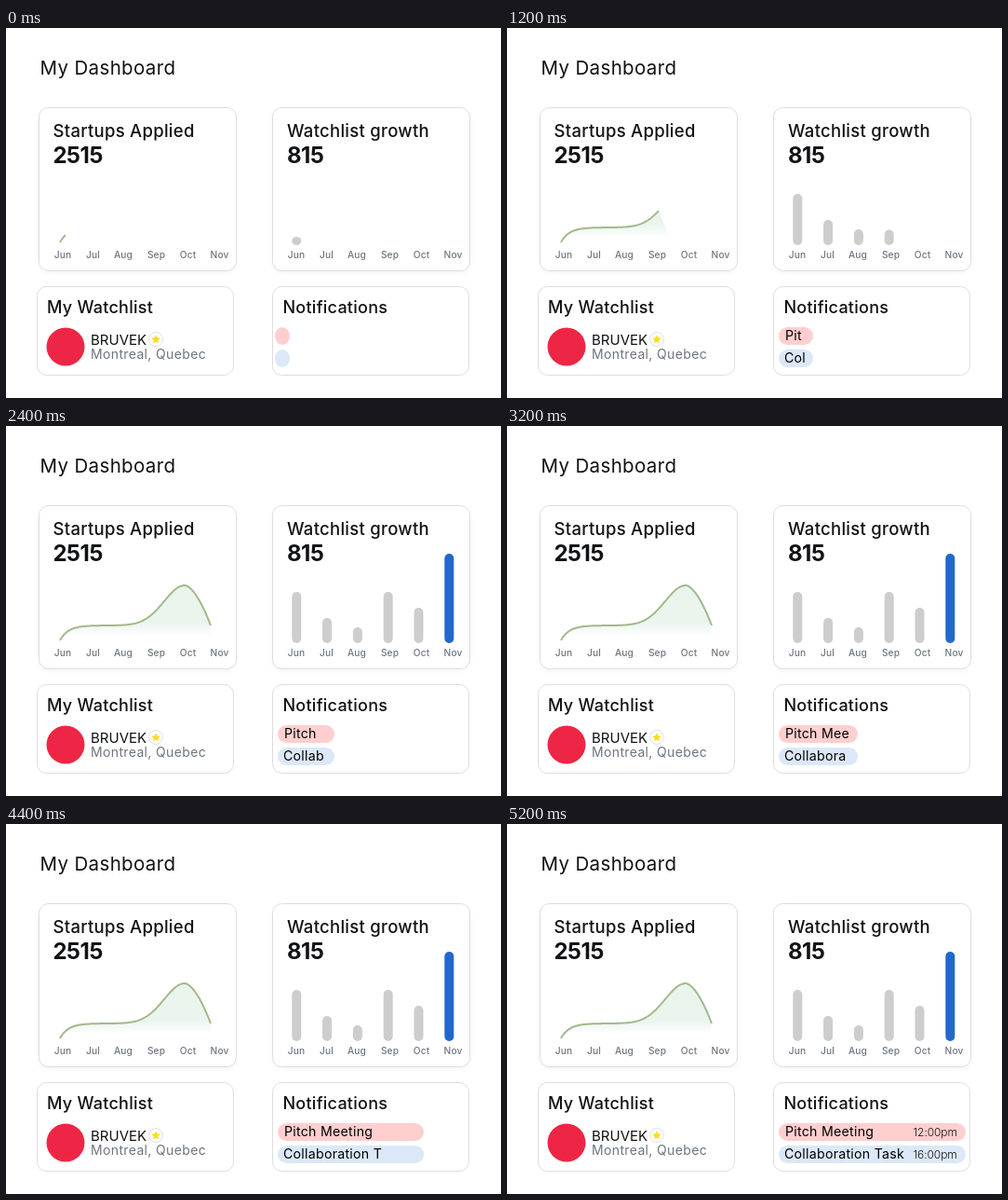
Recreate the animation shown at these times as an HTML page. Size 532 by 397 pixels, loop 5600 ms.

```html
<!DOCTYPE html>
<html lang="en">
<head>
<meta charset="utf-8">
<title>My Dashboard</title>
<style>
  html, body { margin: 0; width: 100%; height: 100%; overflow: hidden; background: #fff; }
  svg { display: block; width: 532px; height: 397px; font-family: Inter, sans-serif; fill: #111214; }
  .card { fill: #fff; stroke: #dcdddf; }
  .raised { filter: drop-shadow(0 2px 2px rgba(0, 0, 0, .04)); }
  .title { font-size: 20.5px; letter-spacing: .35px; }
  .head { font-size: 18.5px; font-weight: 500; letter-spacing: .28px; }
  .sub { font-size: 18px; font-weight: 500; letter-spacing: .25px; }
  .total { font-size: 24px; font-weight: 700; letter-spacing: -.5px; }
  .month { font-size: 10.2px; font-weight: 500; letter-spacing: .1px; fill: #6c757f; text-anchor: middle; }
  .name { font-size: 15px; }
  .place { font-size: 14px; letter-spacing: .36px; fill: #6c757f; }
  .note { font-size: 14.2px; letter-spacing: .25px; fill: #000; }
  .time { font-size: 12px; font-weight: 300; letter-spacing: -.1px; }
</style>
</head>
<body>
<svg viewBox="0 0 532 397">
  <defs>
    <linearGradient id="fade" gradientUnits="userSpaceOnUse" x1="0" y1="170" x2="0" y2="225">
      <stop offset="0" stop-color="#e9f4ec"/>
      <stop offset=".75" stop-color="#ebf5ee"/>
      <stop offset="1" stop-color="#ebf5ee" stop-opacity="0"/>
    </linearGradient>
  </defs>

  <text class="title" x="36.5" y="50">My Dashboard</text>

  <rect class="card raised" x="35.5" y="85.5" width="212" height="175" rx="10"/>
  <rect class="card raised" x="286.5" y="85.5" width="212" height="175" rx="10"/>
  <rect class="card" x="33.5" y="277.5" width="211" height="95" rx="10"/>
  <rect class="card" x="286.5" y="277.5" width="211" height="95" rx="10"/>

  <text class="head" x="50.5" y="117">Startups Applied</text>
  <text class="total" x="50.5" y="145">2515</text>
  <text class="head" x="302" y="117">Watchlist growth</text>
  <text class="total" x="302" y="145">815</text>

  <g id="months"></g>
  <path id="area" fill="url(#fade)"/>
  <path id="line" fill="none" stroke="#a3b98c" stroke-width="2"/>
  <g id="bars"></g>

  <text class="sub" x="44" y="306">My Watchlist</text>
  <circle cx="64" cy="342" r="20.5" fill="#ee2645"/>
  <text class="name" x="91" y="340">BRUVEK</text>
  <circle cx="161" cy="334" r="7.5" fill="#fff" stroke="#dfe0e2"/>
  <path id="star" fill="#ffdc1c"/>
  <text class="place" x="91" y="355">Montreal, Quebec</text>

  <text class="sub" x="297.5" y="306">Notifications</text>
  <g id="notes"></g>
</svg>

<script>
const LOOP = 5600, STEP = 400, BASE = 233;
const $ = id => document.getElementById(id);

function add(parent, tag, attrs, text = '') {
  const el = document.createElementNS('http://www.w3.org/2000/svg', tag);
  for (const k in attrs) el.setAttribute(k, attrs[k]);
  el.textContent = text;
  return parent.appendChild(el);
}

const months = [
  ['Jun', 61, 55], ['Jul', 93.5, 27], ['Aug', 126, 17],
  ['Sep', 161.5, 55], ['Oct', 195.5, 38], ['Nov', 229.5, 96]
];
const bars = months.map(([name, x, full], i) => {
  for (const dx of [0, 251]) add($('months'), 'text', { class: 'month', x: x + dx, y: 247 }, name);
  const fill = name === 'Nov' ? '#2168cd' : '#cdcdcd';
  const el = add($('bars'), 'rect', { x: 307.3 + 32.8 * i, width: 10, rx: 5, fill });
  return { el, full };
});

const notes = [
  ['Pitch Meeting', '12:00pm', 299, 321, '#ffcfcf'],
  ['Collaboration Task', '16:00pm', 298, 345, '#dce8f7']
].map(([text, time, x, y, fill]) => ({
  text,
  pill: add($('notes'), 'rect', { y, height: 19, rx: 9.5, fill }),
  label: add($('notes'), 'text', { class: 'note', x, y: y + 14 }),
  time: add($('notes'), 'text', { class: 'time', x: 436.5, y: y + 14 }, time)
}));

$('star').setAttribute('d', 'M' + Array.from({ length: 10 }, (_, i) => {
  const a = i * Math.PI / 5, r = i % 2 ? 2.4 : 5;
  return `${161 + r * Math.sin(a)} ${334.3 - r * Math.cos(a)}`;
}).join('L') + 'Z');

// Quick rise to a plateau, a bell up to the peak, then a fall to the last point.
const FROM = 58, PEAK = 192, TO = 220;
function curve(x) {
  if (x > PEAK) return 171 + 43 * ((x - PEAK) / (TO - PEAK)) ** 1.7;
  return 214 + 16 * Math.exp((FROM - x) / 9) - 43 * Math.exp(-(((x - PEAK) / 31) ** 2));
}

function drawLine(step) {
  const end = Math.min(64 + 33 * step, TO);
  let d = 'M' + FROM + ' ' + curve(FROM);
  for (let x = FROM + 1; x <= end; x++) d += `L${x} ${curve(x)}`;
  const foot = Math.min(end + (225 - curve(end)) * 0.4, TO);
  $('line').setAttribute('d', d);
  $('area').setAttribute('d', d + `L${foot} 225H62Z`);
}

// One bar joins per step as a stub and is full height in the next.
function drawBars(step) {
  bars.forEach(({ el, full }, i) => {
    const h = step < i ? 0 : step > i ? full : Math.min(full, 9 + 2.5 * i);
    el.setAttribute('y', BASE - h);
    el.setAttribute('height', h);
  });
}

// Right edge of the pills by number of keystrokes.
const edges = [[0, 305], [9, 377], [13, 403], [15, 449], [19, 493]];
function pillEdge(n) {
  const i = Math.max(1, edges.findIndex(([k]) => k >= n));
  const [[a, from], [b, to]] = [edges[i - 1], edges[i]];
  return Math.round(from + (to - from) * (n - a) / (b - a));
}

function drawNotes(t) {
  // Typing doubles its speed after the seventh keystroke.
  const keys = Math.min(19, Math.floor(t < 2800 ? t / STEP : 7 + (t - 2800) / 200));
  const left = Math.min(292, 289 + 3 * keys);
  for (const { text, pill, label, time } of notes) {
    pill.setAttribute('x', left);
    pill.setAttribute('width', pillEdge(keys) - left);
    label.textContent = text.slice(0, keys);
    time.style.display = keys > 18 ? '' : 'none';
  }
}

const start = performance.now();
function tick() {
  const t = (performance.now() - start) % LOOP;
  const step = Math.floor(t / STEP);
  drawLine(step);
  drawBars(step);
  drawNotes(t);
  requestAnimationFrame(tick);
}
tick();
</script>
</body>
</html>
```
